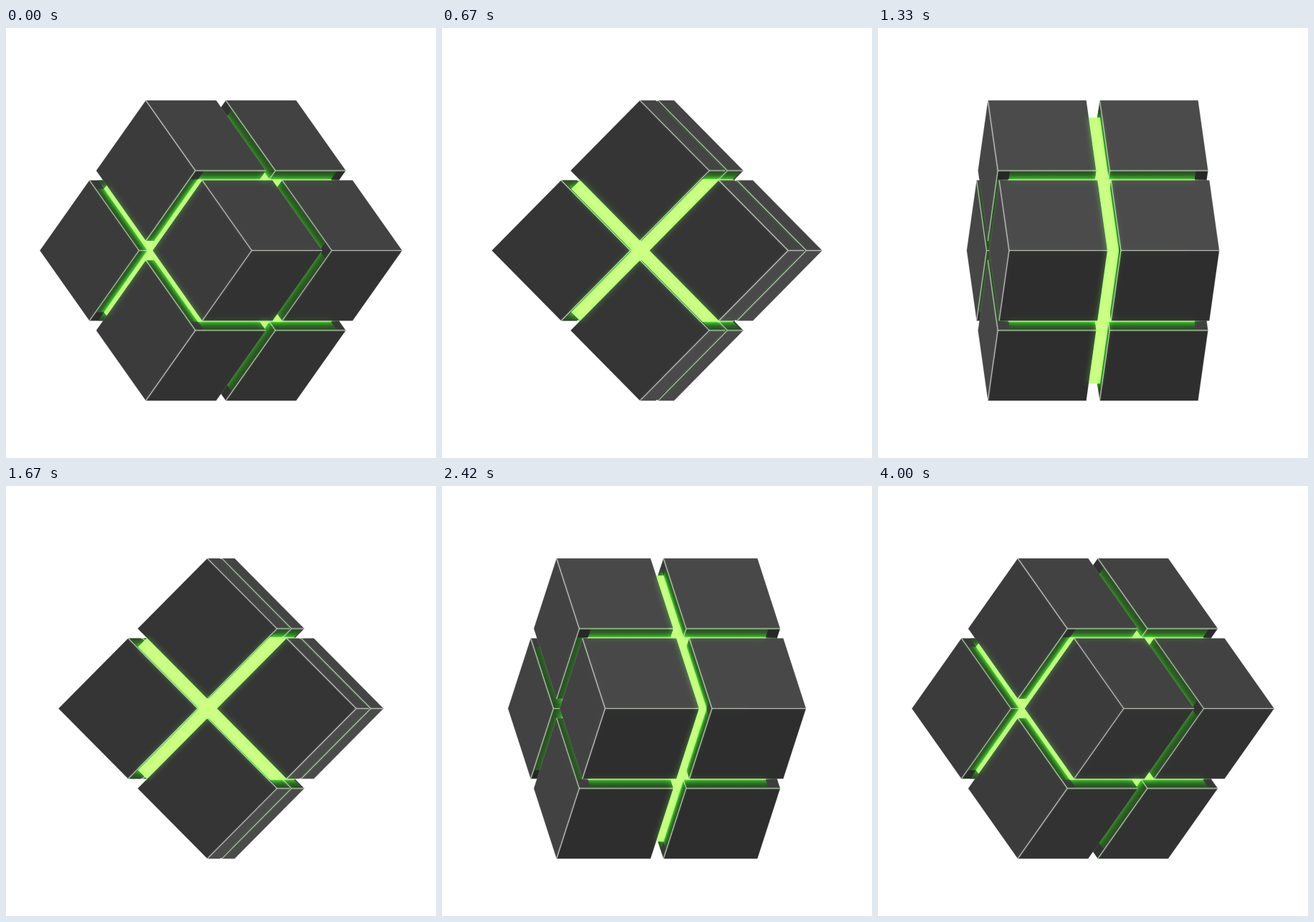
An HTML page with a canvas for the animation above (4.08 s loop, 600x600 px).

```html
<!DOCTYPE html>
<html lang="en">
<head>
<meta charset="utf-8">
<title>Glowing cubes</title>
<style>
html, body { margin: 0; width: 100%; height: 100%; overflow: hidden; background: #fff; }
canvas { display: block; width: 600px; height: 600px; }
</style>
</head>
<body>
<canvas id="stage" width="600" height="600"></canvas>
<script>
const ctx = document.getElementById('stage').getContext('2d');
const glow = document.createElement('canvas');
glow.width = glow.height = 600;
const glowCtx = glow.getContext('2d');

const LOOP = 4080, FPS = 12;
const CX = 300, CY = 310.5;
const GAP = 9.5, OUTER = 148.1, CORE = 131;
const START = 45.1;

// seconds, degrees turned
const TURN = [[0, 0], [.333, 8.4], [.667, 35.9], [1, 80.2], [1.583, 198.5], [1.667, 217.8],
  [1.833, 254], [2.083, 293], [2.417, 334], [2.833, 358.1], [3.1, 360.8], [3.5, 360], [4.1, 360]];

const rate = i => (TURN[i + 1][1] - TURN[i][1]) / (TURN[i + 1][0] - TURN[i][0]);

function slope(i) {
  if (i === 0 || i === TURN.length - 1) return 0;
  const a = TURN[i][0] - TURN[i - 1][0], b = TURN[i + 1][0] - TURN[i][0];
  return (rate(i - 1) * b + rate(i) * a) / (a + b);
}

function turnAt(t) {
  let i = 0;
  while (i < TURN.length - 2 && t >= TURN[i + 1][0]) i++;
  const [t0, y0] = TURN[i], [t1, y1] = TURN[i + 1];
  const h = t1 - t0, s = (t - t0) / h, r = 1 - s;
  return y0 * r * r * (1 + 2 * s) + y1 * s * s * (3 - 2 * s)
    + h * s * r * (slope(i) * r - slope(i + 1) * s);
}

// Three cube axes in view space: x right, y up, z towards the viewer
function axesAt(angle) {
  const s = Math.sin(angle), c = Math.cos(angle), d = Math.SQRT1_2;
  return [[-s, 0, c], [c * d, d, s * d], [c * d, -d, s * d]];
}

function project(ax, p) {
  let x = CX, y = CY;
  for (let i = 0; i < 3; i++) {
    x += ax[i][0] * p[i];
    y -= ax[i][1] * p[i];
  }
  return [x, y];
}

function path(c, pts) {
  c.beginPath();
  pts.forEach((p, i) => i ? c.lineTo(p[0], p[1]) : c.moveTo(p[0], p[1]));
  c.closePath();
}

function fill(c, pts, style) {
  path(c, pts);
  c.fillStyle = style;
  c.fill();
}

function line(a, b, width, style) {
  ctx.beginPath();
  ctx.moveTo(a[0], a[1]);
  ctx.lineTo(b[0], b[1]);
  ctx.lineWidth = width;
  ctx.strokeStyle = style;
  ctx.stroke();
}

function point(p, a, q, b, r, c) {
  const v = [0, 0, 0];
  v[p] = a; v[q] = b; v[r] = c;
  return v;
}

function quad(ax, p, at, q, q0, q1, r, r0, r1) {
  return [[q0, r0], [q1, r0], [q1, r1], [q0, r1]]
    .map(([b, c]) => project(ax, point(p, at, q, b, r, c)));
}

function shade(n) {
  const [x, y, z] = n, rim = (1 - z) * (1 - z);
  if (y > .1) return 52 - 8 * x + 35.5 * y - 30 * x * y + 14 * rim;
  if (y < -.1) return 43 - 8 * x + 45 * rim;
  return 52 - 8 * x + 14 * rim;
}

const grey = v => { v = Math.round(v); return `rgb(${v},${v},${v})`; };

// Light from the core on the outer rim of a gap wall
function lightWall(ax, p, at, q, sq, r, sr) {
  const pts = quad(ax, p, at, q, sq * OUTER, sq * CORE, r, sr * GAP, sr * CORE);
  const [a, b, , d] = pts;
  let nx = -(d[1] - a[1]), ny = d[0] - a[0];
  const len = Math.hypot(nx, ny);
  if (len < .5) return;
  nx /= len; ny /= len;
  const k = (b[0] - a[0]) * nx + (b[1] - a[1]) * ny;
  if (Math.abs(k) < .05) return;
  const g = ctx.createLinearGradient(a[0], a[1], a[0] + nx * k, a[1] + ny * k);
  g.addColorStop(0, '#2c4628');
  g.addColorStop(.5, '#2a6420');
  g.addColorStop(1, '#37ac26');
  fill(ctx, pts, g);
}

function drawCube(ax, side, near) {
  const lo = side.map(s => s > 0 ? GAP : -OUTER);
  const hi = side.map(s => s > 0 ? OUTER : -GAP);
  const front = near.map((s, i) => s > 0 ? hi[i] : lo[i]);
  const back = near.map((s, i) => s > 0 ? lo[i] : hi[i]);
  const isWall = near.map((s, i) => s !== side[i]);

  for (let p = 0; p < 3; p++) {
    const q = (p + 1) % 3, r = (p + 2) % 3;
    const pts = quad(ax, p, front[p], q, lo[q], hi[q], r, lo[r], hi[r]);
    const tone = shade(ax[p].map(v => v * near[p]));
    fill(ctx, pts, grey(isWall[p] ? tone * .85 : tone));
    fill(glowCtx, pts, '#000');
    if (isWall[p]) {
      lightWall(ax, p, front[p], q, side[q], r, side[r]);
      lightWall(ax, p, front[p], r, side[r], q, side[q]);
    }
    path(ctx, pts);
    ctx.lineWidth = .8;
    ctx.strokeStyle = 'rgba(150,150,150,.3)';
    ctx.stroke();
  }

  const corner = project(ax, front);
  for (let p = 0; p < 3; p++) {
    const end = front.slice();
    end[p] = back[p];
    const far = project(ax, end);
    const lit = isWall[(p + 1) % 3] || isWall[(p + 2) % 3];
    line(corner, far, 4, 'rgba(255,255,255,.05)');
    line(corner, far, 1.2, lit ? 'rgba(188,222,180,.8)' : 'rgba(212,212,212,.8)');
  }
}

function drawCore(ax, side, near) {
  const lo = side.map(s => s < 0 ? -CORE : s > 0 ? GAP : -GAP);
  const hi = side.map(s => s < 0 ? -GAP : s > 0 ? CORE : GAP);
  for (let p = 0; p < 3; p++) {
    const q = (p + 1) % 3, r = (p + 2) % 3;
    const at = near[p] > 0 ? hi[p] : lo[p];
    const pts = quad(ax, p, at, q, lo[q], hi[q], r, lo[r], hi[r]);
    fill(ctx, pts, '#b2ff74');
    path(ctx, pts);
    ctx.lineWidth = .6;
    ctx.strokeStyle = '#b2ff74';
    ctx.stroke();
    fill(glowCtx, pts, '#48e028');
  }
}

function draw(ms) {
  const t = Math.floor((ms + 3.4) / 1000 * FPS) / FPS;
  const ax = axesAt((START - turnAt(t)) * Math.PI / 180);
  const near = ax.map(a => a[2] >= 0 ? 1 : -1);

  ctx.fillStyle = '#fff';
  ctx.fillRect(0, 0, 600, 600);
  glowCtx.clearRect(0, 0, 600, 600);
  ctx.lineJoin = 'round';

  // Grid cells from far to near
  const steps = [-1, 0, 1];
  for (const i of steps) for (const j of steps) for (const k of steps) {
    const side = [i * near[0], j * near[1], k * near[2]];
    (i && j && k ? drawCube : drawCore)(ax, side, near);
  }

  ctx.save();
  ctx.globalCompositeOperation = 'lighter';
  ctx.globalAlpha = .4;
  ctx.filter = 'blur(4px)';
  ctx.drawImage(glow, 0, 0);
  ctx.restore();
}

const begin = performance.now();
function tick() {
  draw((performance.now() - begin) % LOOP);
  requestAnimationFrame(tick);
}
tick();
</script>
</body>
</html>
```
